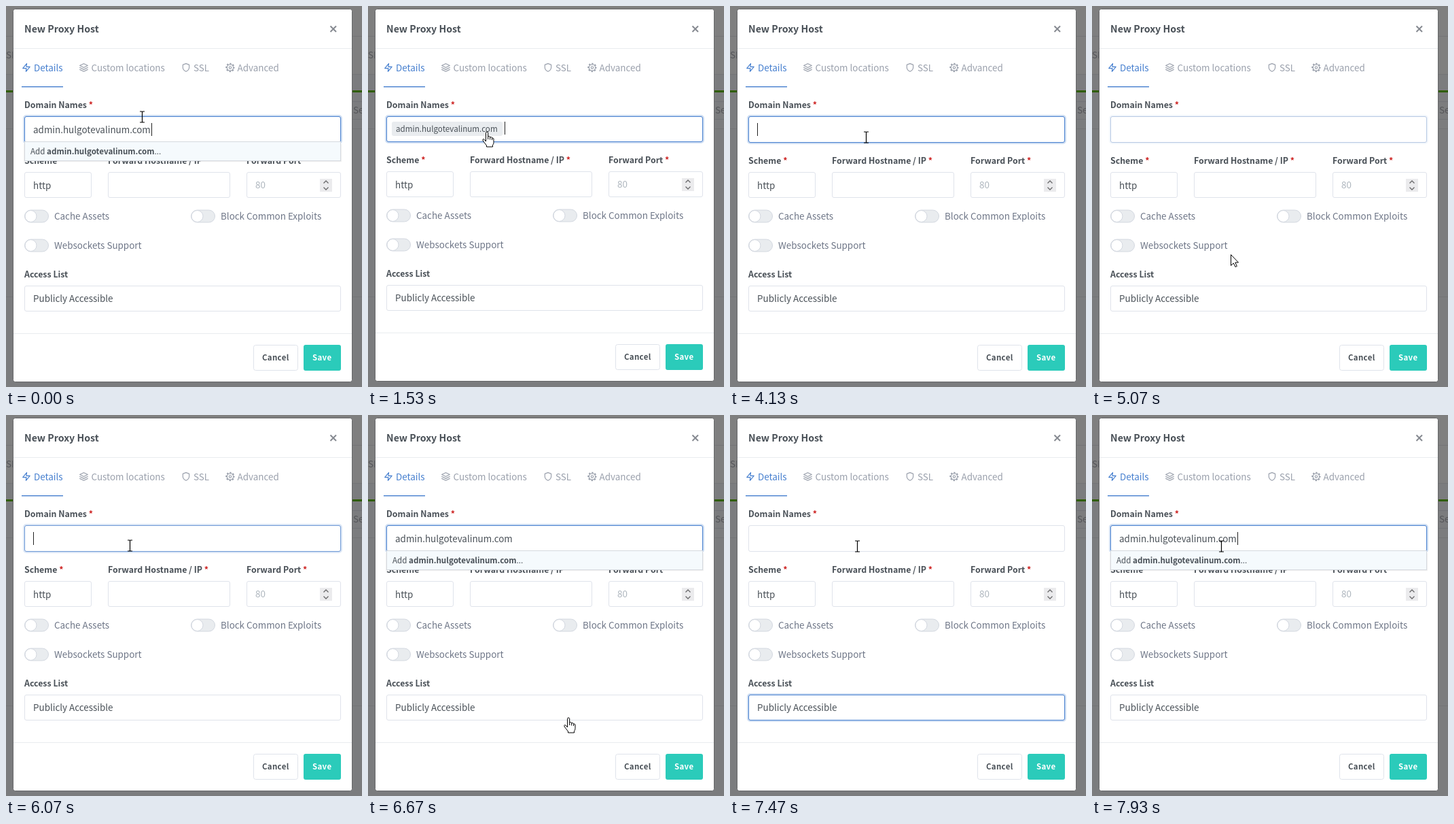
An HTML page for the animation above (8000 ms loop, 524 by 560 pixels).

```html
<!DOCTYPE html>
<html lang="en">
<head>
<meta charset="utf-8">
<title>New Proxy Host</title>
<style>
html, body { margin: 0; width: 100%; height: 100%; overflow: hidden; background: #7b7c7e; }
svg { display: block; width: 524px; height: 560px; }
text { font: 400 13.43px "Noto Sans CJK JP", "Noto Sans CJK SC", "Noto Sans CJK", "Open Sans", sans-serif; fill: #495057; white-space: pre; }
.title { font-size: 14.2px; font-weight: 700; }
.label { font-size: 12.35px; font-weight: 700; }
.label tspan { fill: #cd201f; }
.small { font-size: 11.64px; }
.bold { font-weight: 700; }
.btn { font-size: 11.45px; font-weight: 700; letter-spacing: .03em; }
.tab { fill: #9aa0ac; }
.muted { fill: #6e7687; }
.hint { fill: #adb5bd; }
.on { fill: #467fcf; }
.dim { fill: #55565a; }
.box { fill: #fff; stroke: #dfe3eb; }
.icon { fill: none; stroke: #9aa0ac; stroke-width: 2; stroke-linecap: round; stroke-linejoin: round; }
.icon.lit { stroke: #467fcf; }
.rule { stroke: #e9ecef; }
.ring { fill: none; stroke: #467fcf; stroke-width: 2; stroke-opacity: .25; }
.edge { fill: none; stroke: #467fcf; }
</style>
</head>
<body>
<svg viewBox="0 0 524 560">
  <defs>
    <g id="switch">
      <rect x=".5" y=".5" width="35" height="18" rx="9" fill="#e9ecef" stroke="#d3d8e0"/>
      <circle cx="9.5" cy="9.5" r="8.5" fill="#fff" stroke="#d3d8e0"/>
    </g>
  </defs>

  <!-- dimmed page -->
  <rect width="524" height="560" fill="#7b7c7e"/>
  <rect width="524" height="100" fill="#7f7f7f"/>
  <path d="M0 44.5H524M0 100.5H524M0 180.5H524M0 427.5H524" stroke="#737476"/>
  <rect y="124" width="524" height="3" fill="#2f5d00"/>
  <path d="M524 140.5H508V166.5H524" fill="none" stroke="#707276"/>
  <text class="dim" x="0" y="77">SL</text>
  <text class="dim" x="511" y="158">Search</text>

  <!-- dialog -->
  <rect id="modal" x="10.5" y="4.5" width="499" height="548" rx="3" fill="#fff" stroke="#666769"/>
  <text class="title" x="27" y="39">New Proxy Host</text>
  <path d="M477.5 29.5l8.5 8.5M486 29.5l-8.5 8.5" stroke="#868a91" stroke-width="2"/>
  <path class="rule" d="M11 62.5H509"/>

  <g class="icon lit" transform="translate(23 83.5) scale(.58)"><path d="M13 2L3 14H12L11 22L21 10H12Z"/></g>
  <text class="on" x="41" y="96">Details</text>
  <rect x="23" y="118" width="61" height="1.4" fill="#467fcf"/>
  <g class="icon" transform="translate(107.5 83.5) scale(.58)"><path d="M12 2L2 7L12 12L22 7ZM2 17L12 22L22 17M2 12L12 17L22 12"/></g>
  <text class="tab" x="125.500" y="96">Custom locations</text>
  <g class="icon" transform="translate(258 83.500) scale(.58)"><path d="M12 22s8-4 8-10V5l-8-3-8 3v7c0 6 8 10 8 10z"/></g>
  <text class="tab" x="276" y="96">SSL</text>
  <g class="icon" transform="translate(323 83.5) scale(.58)">
    <circle cx="12" cy="12" r="3"/><circle cx="12" cy="12" r="8"/>
    <circle cx="12" cy="12" r="10" stroke-width="3.2" stroke-linecap="butt" pathLength="16" stroke-dasharray="1" stroke-dashoffset=".5"/>
  </g>
  <text class="tab" x="340.5" y="96">Advanced</text>

  <text class="label" x="27" y="150">Domain Names <tspan>*</tspan></text>

  <g id="lower">
    <text class="label" x="27" y="232">Scheme <tspan>*</tspan></text>
    <text class="label" x="150" y="232">Forward Hostname / IP <tspan>*</tspan></text>
    <text class="label" x="354" y="232">Forward Port <tspan>*</tspan></text>
    <rect class="box" x="27.5" y="244.5" width="98" height="37" rx="2.5"/>
    <rect class="box" x="150.5" y="244.5" width="179" height="37" rx="2.5"/>
    <rect class="box" x="354.5" y="244.5" width="138" height="37" rx="2.5"/>
    <text x="40" y="269">http</text>
    <text class="hint" x="367" y="268">80</text>
    <rect x="462" y="254" width="18" height="19" fill="#ebebed"/>
    <path d="M467.500 260.5l3.500-3.500 3.500 3.500M467.500 266.5l3.500 3.500 3.500-3.500" fill="none" stroke="#6a6a6c" stroke-width="1.3"/>
    <use href="#switch" x="27" y="299.5"/>
    <text class="muted" x="71" y="314">Cache Assets</text>
    <use href="#switch" x="272" y="299.5"/>
    <text class="muted" x="316" y="314">Block Common Exploits</text>
    <use href="#switch" x="27" y="342.5"/>
    <text class="muted" x="71" y="357">Websockets Support</text>
    <text class="label" x="27" y="399">Access List</text>
    <rect class="box" x="27.5" y="411.5" width="465" height="37" rx="2.5"/>
    <g id="accessFocus">
      <rect class="ring" x="26" y="410" width="468" height="40" rx="4"/>
      <rect class="edge" x="27.5" y="411.5" width="465" height="37" rx="2.5"/>
    </g>
    <text x="40" y="435">Publicly Accessible</text>
    <path class="rule" d="M11 481.5H509"/>
    <rect class="box" x="364.5" y="498.5" width="65" height="37" rx="3"/>
    <text class="btn" x="377" y="521">Cancel</text>
    <rect x="438" y="498" width="55" height="38" rx="3" fill="#2bcbba"/>
    <text class="btn" x="451" y="521" style="fill:#fff">Save</text>
  </g>

  <!-- domain field -->
  <rect class="box grow" x="27.5" y="162.5" width="465" height="38" rx="2.5"/>
  <g id="domainFocus">
    <rect class="ring grow" x="26" y="161" width="468" height="41" rx="4"/>
    <rect class="edge grow" x="27.5" y="162.5" width="465" height="38" rx="2.5"/>
  </g>
  <g id="chip">
    <rect x="35" y="170" width="163" height="21" rx="3" fill="#e9ecef"/>
    <text id="chipText" class="small" x="41" y="185">admin.hulgotevalinum.com</text>
  </g>
  <g id="typed">
    <text x="40" y="187">admin.hulgotevalinum.com</text>
    <rect x="26" y="203" width="468" height="26" fill="#000" opacity=".06"/>
    <rect x="27.5" y="199.5" width="465" height="28" fill="#f5fafd" stroke="#d5d9df"/>
    <text class="small" x="36" y="218">Add <tspan class="bold">admin.hulgotevalinum.com</tspan>...</text>
  </g>
  <rect id="caret" width="1" height="19" fill="#222"/>

  <!-- pointers, origin at the hot spot -->
  <g id="beam">
    <path d="M-3.500-8H-1Q0-8 0-7Q0-8 1-8H3.500M0-7V7M-3.500 8H-1Q0 8 0 7Q0 8 1 8H3.500" transform="translate(.5 0)" fill="none" stroke="#000" stroke-width="1.2"/>
  </g>
  <g id="arrow">
    <path d="M.5 .5V16.500L4.300 13L7 18.500L9.300 17.500L6.800 12H11.500Z" fill="#fff" stroke="#000"/>
  </g>
  <g id="hand">
    <path d="M-1.500 14V1.500Q-1.500 0 0 0Q1.700 0 1.700 1.500V7.500Q2 6.300 3.300 6.500Q4.700 6.700 4.700 8.500Q5 7.300 6.300 7.600Q7.600 7.900 7.600 9.500Q8 8.600 9 9Q10 9.500 10 11V15.500Q10 18 8.500 19.500V22H-.5V20Q-3 17-5.800 13Q-6.800 11-5.300 10.600Q-3.800 10.500-1.500 14Z" fill="#fff" stroke="#000" stroke-linejoin="round"/>
    <path d="M1.700 7.500V11M4.700 8.500V11.500M7.600 9.500V12" stroke="#000"/>
  </g>
</svg>

<script>
const LOOP = 8000, FADE = 300, STEP = 200 / 3;
const $ = id => document.getElementById(id);
const show = (el, on) => el.style.display = on ? '' : 'none';
const within = (t, spans) => spans.find(([a, b]) => t >= a && t < b);
const grow = [...document.querySelectorAll('.grow')].map(el => [el, +el.getAttribute('height')]);
const pointers = { i: $('beam'), a: $('arrow'), h: $('hand') };

const TYPED = [[0, 800], [6130, 6730], [7800, LOOP]];
const CHIP = [[800, 3400]];
const PICKED = [[1930, 3070], [3130, 3400]];
// start, end, x
const CARET = [
  [0, 400, 214], [800, 930, 201], [1470, 1930, 201], [3070, 3130, 201],
  [3400, 3600, 40], [4130, 4670, 40], [5870, 6130, 40], [6130, 6630, 214],
  [7600, 7800, 40], [7800, LOOP, 214]
];
// time, x, y, pointer
const PATH = [
  [70, 200, 163, 'i'], [130, 206, 175, 'i'], [1330, 206, 175, 'i'], [1400, 199, 179, 'i'],
  [1470, 184, 184, 'h'], [1530, 175, 185, 'h'], [1930, 175, 185, 'h'], [2000, 172, 189, 'h'],
  [2470, 172, 189, 'h'], [2530, 165, 189, 'h'], [2670, 188, 187, 'h'], [2730, 210, 193, 'i'],
  [2800, 224, 196, 'i'], [2930, 214, 192, 'i'], [3330, 214, 192, 'i'], [3400, 206, 195, 'i'],
  [3530, 206, 195, 'i'], [3930, 200, 193, 'i'], [4400, 200, 193, 'i'], [4530, 202, 215, 'a'],
  [4800, 205, 350, 'a'], [4930, 204, 365, 'a'], [5470, 204, 365, 'a'], [5670, 174, 205, 'a'],
  [5800, 174, 205, 'a'], [5870, 176, 192, 'i'], [6330, 190, 192, 'i'], [6400, 215, 230, 'a'],
  [6600, 285, 425, 'h'], [6670, 295, 445, 'h'], [6730, 296, 447, 'h'], [6800, 300, 480, 'a'],
  [6930, 303, 540, 'a'], [7070, 300, 536, 'a'], [7200, 265, 425, 'h'], [7270, 235, 320, 'a'],
  [7400, 190, 205, 'i'], [7470, 187, 193, 'i'], [7870, 187, 193, 'i'], [7930, 190, 193, 'i']
];

const ramp = (t, start) => {
  const p = Math.min(1, Math.max(0, (t - start) / FADE));
  return p * p * (3 - 2 * p);
};

function pointerAt(t) {
  const k = PATH.findIndex(p => p[0] > t);
  if (k === 0) return PATH[0].slice(1);
  if (k < 0) return PATH[PATH.length - 1].slice(1);
  const [t0, x0, y0, kind] = PATH[k - 1], [t1, x1, y1] = PATH[k];
  const p = (t - t0) / (t1 - t0);
  return [Math.round(x0 + (x1 - x0) * p), Math.round(y0 + (y1 - y0) * p), kind];
}

function draw(t) {
  const chip = within(t, CHIP), shift = chip ? 1 : 0;
  show($('chip'), chip);
  show($('typed'), within(t, TYPED));
  $('chipText').style.fill = within(t, PICKED) ? '#303030' : '';
  $('lower').setAttribute('transform', `translate(0 ${-shift})`);
  $('modal').setAttribute('height', 548 - shift);
  for (const [el, h] of grow) el.setAttribute('height', h - shift);

  $('domainFocus').style.opacity = 1 - ramp(t, 4870) + ramp(t, 5870) - ramp(t, 6730) + ramp(t, 7600);
  $('accessFocus').style.opacity = ramp(t, 6730) - ramp(t, 7600);

  const caret = within(t, CARET);
  show($('caret'), caret);
  if (caret) {
    $('caret').setAttribute('x', caret[2]);
    $('caret').setAttribute('y', chip ? 170 : 172);
  }

  const [x, y, kind] = pointerAt(t);
  for (const k in pointers) show(pointers[k], k === kind);
  pointers[kind].setAttribute('transform', `translate(${x} ${y})`);
}

const tick = t => Math.round(Math.floor((t + 4) / STEP) * STEP / 10) * 10;
const start = performance.now();
function loop() {
  draw(tick((performance.now() - start) % LOOP) % LOOP);
  requestAnimationFrame(loop);
}
loop();
</script>
</body>
</html>
```
